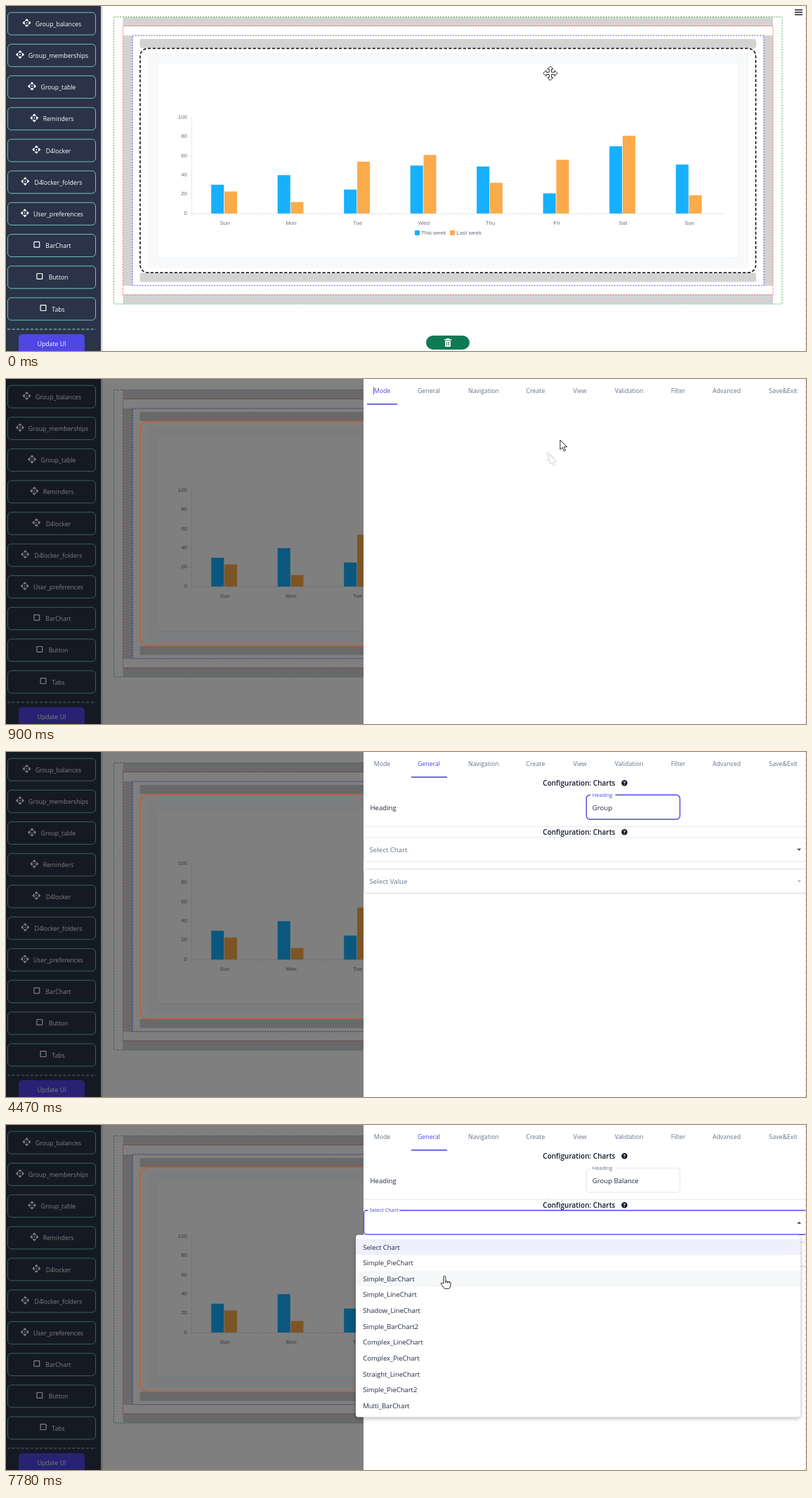
Recreate the animation shown at these times as an HTML page. Size 1139 by 492 pixels, loop 8 s.

```html
<!DOCTYPE html>
<html lang="en">
<head>
<meta charset="utf-8">
<title>Chart builder</title>
<style>
  html, body { margin: 0; width: 100%; height: 100%; overflow: hidden; background: #fff; }
  svg { display: block; width: 100vw; height: 100vh; }
  text { font-family: "Open Sans", "Noto Sans", sans-serif; white-space: pre; }
  .chart text { font-family: "Liberation Sans", Arial, sans-serif; font-size: 7.9px; fill: #6b7180; }
  .side text { font-size: 8.7px; fill: #fff; text-anchor: middle; }
  .tabs text { font-size: 8.8px; fill: #64748b; text-anchor: middle; }
  .title { font-size: 10px; font-weight: 600; fill: #111827; }
  .body { font-size: 9.6px; fill: #1e293b; }
  .muted { font-size: 9.7px; fill: #64748b; }
  .menu text { font-size: 9.45px; fill: #1e293b; }
  #menu { filter: drop-shadow(0 2px 3px rgba(0, 0, 0, .28)); }
</style>
</head>
<body>
<svg id="stage" viewBox="0 0 1139 492"></svg>
<script>
const LOOP = 8000, INDIGO = '#4f46e5', INK = '#1e293b', PALE = '#e2e6ec';

// ---------- markup helpers ----------
const attrs = o => Object.entries(o).map(([k, v]) => ` ${k}="${v}"`).join('');
const rect = (x, y, x2, y2, fill, more = {}) =>
  `<rect${attrs({ x, y, width: x2 - x, height: y2 - y, fill, ...more })}/>`;
const frame = (x, y, x2, y2, stroke, more = {}) => rect(x, y, x2, y2, 'none', { stroke, ...more });
const line = (x, y, x2, y2, stroke, more = {}) =>
  `<path${attrs({ d: `M${x} ${y}L${x2} ${y2}`, stroke, fill: 'none', ...more })}/>`;
const text = (x, y, str, more = {}) =>
  `<text${attrs({ x, y, ...more })}>${str.replace('&', '&amp;')}</text>`;
const group = (more, ...parts) => `<g${attrs(more)}>${parts.flat().join('')}</g>`;

// ---------- sidebar ----------
const tiles = [
  ['Group_balances', 29.5], ['Group_memberships', 20], ['Group_table', 37],
  ['Reminders', 40.3], ['D4locker', 43.3], ['D4locker_folders', 27.3],
  ['User_preferences', 26.8], ['BarChart', 43.8, 1], ['Button', 47.8, 1], ['Tabs', 53, 1]
];
const ARM = 'M0-6l2.1 2.1 2.5-2.5L0-11l-4.6 4.6 2.5 2.5z';
const moveIcon = (x, y) => group({ transform: `translate(${x} ${y}) scale(.55)`, fill: '#fff' },
  [0, 90, 180, 270].map(a => `<path d="${ARM}" transform="rotate(${a})"/>`),
  '<path d="M0-2l2 2-2 2-2-2z"/>');

function sidebar() {
  const rows = tiles.map(([name, x, box], i) => {
    const y = 9.2 + 45.2 * i;
    return frame(2.5, y, 127.5, y + 32, '#81e6d9', { rx: 5, 'stroke-width': .8 }) +
      (box ? frame(x - 3.9, y + 10.7, x + 3.9, y + 18.5, '#fff', { 'stroke-width': 1.2, rx: .5 })
           : moveIcon(x, y + 14.8)) +
      text(74.5, y + 19.5, name);
  });
  return group({ class: 'side' },
    rect(0, 0, 135, 492, '#2a3347'), rect(135, 0, 137.5, 492, '#d4d5d9'), rows,
    line(2, 461, 128, 461, '#81e6d9', { 'stroke-dasharray': '4 2.6', 'stroke-width': 1.2 }),
    rect(18, 468, 112, 496, INDIGO, { rx: 5 }), text(65, 485, 'Update UI'));
}

// ---------- canvas with chart ----------
const days = ['Sun', 'Mon', 'Tue', 'Wed', 'Thu', 'Fri', 'Sat', 'Sun'];
const thisWeek = [30, 40, 25, 50, 49, 21, 70, 51];
const lastWeek = [23, 12, 54, 61, 32, 56, 81, 19];
const BLUE = '#16b0ff', ORANGE = '#fcab4b';

function chart() {
  const top = v => 296 - 1.37 * v, step = 94.5;
  const ticks = [0, 20, 40, 60, 80, 100].map(v =>
    text(258, top(v) + 1.8, String(v), { 'text-anchor': 'end' }) +
    line(261.5, top(v), 264.5, top(v), '#e3e6ec', { 'stroke-width': .7 }));
  const bars = days.map((day, i) => {
    const c = 311.5 + step * i;
    return rect(c - 19.3, top(thisWeek[i]), c - 1.3, 296, BLUE) +
      rect(c - .5, top(lastWeek[i]), c + 17.5, 296, ORANGE) +
      text(c, 312, day, { 'text-anchor': 'middle' }) +
      line(264.5 + step * (i + 1), 296, 264.5 + step * (i + 1), 299, '#dde1e8', { 'stroke-width': .7 });
  });
  return group({ class: 'chart' }, ticks,
    line(264.5, 159, 264.5, 299, '#dde1e8', { 'stroke-width': .8 }), bars,
    line(264.5, 296.3, 1021, 296.3, '#dde1e8', { 'stroke-width': .8 }),
    rect(582, 320, 589, 327, BLUE, { rx: 1 }), text(591, 326.3, 'This week'),
    rect(632, 320, 639, 327, ORANGE, { rx: 1 }), text(641.3, 326.3, 'Last week'));
}

function canvas() {
  const grey = '#d3d3d3', thin = { 'stroke-width': .9, 'stroke-dasharray': '2 1.8' };
  return rect(166.5, 16, 1092, 29, grey) + rect(166.5, 411.5, 1092, 424.5, grey) +
    rect(167, 42, 180, 399, grey) + rect(1079, 42, 1092, 399, grey) +
    rect(190.5, 47, 1068, 60, grey, { rx: 3 }) + rect(190.5, 380.5, 1068, 393.5, grey, { rx: 3 }) +
    frame(153.5, 15.5, 1105, 425, '#3faa48', { ...thin, rx: 1 }) +
    frame(166.5, 28.5, 1092, 412, '#ff4a4a', thin) +
    frame(180, 42, 1079, 398.7, '#3a3aff', thin) +
    rect(191, 60.5, 1068, 380.5, '#fff', { rx: 11 }) +
    rect(202, 67, 1057, 374, '#f8f9fb', { rx: 2 }) +
    rect(217, 82.5, 1041.5, 360, '#eceef1', { rx: 4 }) +
    rect(217, 82, 1041, 359, '#fff', { rx: 4 }) + chart() +
    [5.6, 9, 12.4].map(y => line(1123, y, 1134, y, '#1a1a1a', { 'stroke-width': 1.5 })).join('') +
    rect(598, 470, 660, 490, '#0d7a55', { rx: 10 }) +
    rect(625.2, 477, 633, 486, '#fff', { rx: 1 }) + rect(624, 475, 634.3, 476.3, '#fff') +
    rect(627, 474, 631.2, 475.3, '#fff') +
    line(627.7, 478.8, 627.7, 484.2, '#0d7a55') + line(630.5, 478.8, 630.5, 484.2, '#0d7a55');
}

// ---------- settings drawer ----------
const tabs = [['Mode', 535.5], ['General', 602], ['Navigation', 680], ['Create', 754], ['View', 817],
  ['Validation', 887], ['Filter', 957], ['Advanced', 1026], ['Save&Exit', 1106.5]];
const ARROW = 'M0 0V13.6L3.2 10.7 5.4 15.8 7.6 14.9 5.4 9.9H9.9Z';

const heading = y => text(764.3, y + 3.6, 'Configuration: Charts', { class: 'title' }) +
  `<circle cx="880.5" cy="${y}" r="4.2" fill="#111827"/>` +
  text(880.5, y + 2.5, '?', { 'font-size': 7, 'font-weight': 700, fill: '#fff', 'text-anchor': 'middle' });

function drawer() {
  const ghost = (x, y) =>
    `<path d="${ARROW}" transform="translate(${x} ${y})" fill="#fff" stroke="#cfcfcf" stroke-width=".8"/>`;
  return group({ id: 'drawer' },
    rect(509, 0, 1139, 492, '#fff'),
    group({ id: 'trail' }, ghost(771.5, 104), ghost(774, 108)),
    group({ class: 'tabs' }, tabs.map(([name, x], i) => text(x, 20, name, { id: 'tab' + i }))),
    line(523.5, 11, 523.5, 22.5, '#555', { id: 'beam', 'stroke-width': .8 }),
    rect(514, 35, 557, 36.6, INDIGO, { id: 'underline' }),
    group({ id: 'general' },
      heading(44.3),
      text(518.5, 82.8, 'Heading', { class: 'body' }),
      frame(826.3, 61.3, 959.5, 96, PALE, { id: 'field', rx: 5 }),
      rect(832, 59.5, 867.5, 63.5, '#fff', { id: 'notch' }),
      text(0, 0, 'Heading', { id: 'label', class: 'muted' }),
      text(834.8, 82.8, '', { id: 'typed', class: 'body' }),
      rect(0, 72.5, .9, 86, '#111', { id: 'caret' }),
      line(509, 106.3, 1139, 106.3, '#e4e7ec'),
      heading(114.3),
      frame(509.5, 121.8, 1143, 156.3, PALE, { id: 'select', rx: 4 }),
      rect(515.5, 119.5, 560, 123.5, '#fff', { id: 'selectNotch' }),
      text(0, 0, 'Select Chart', { id: 'selectLabel', class: 'muted' }),
      '<path id="chevron" fill="#444"/>',
      frame(509.5, 167, 1143, 201.5, '#d5dae2', { rx: 4 }),
      text(517.5, 187.7, 'Select Value', { class: 'muted' }),
      '<path d="M1126.2 183h6l-3 3z" fill="#b5b8bd"/>'));
}

const options = ['Select Chart', 'Simple_PieChart', 'Simple_BarChart', 'Simple_LineChart',
  'Shadow_LineChart', 'Simple_BarChart2', 'Complex_LineChart', 'Complex_PieChart',
  'Straight_LineChart', 'Simple_PieChart2', 'Multi_BarChart'];
const ROW = 22.65, ROW_TOP = 162.8;

const menu = () => group({ id: 'menu', class: 'menu' },
  rect(498, 156.7, 1131, 416.5, '#fff', { rx: 4 }),
  rect(498, ROW_TOP, 1131, ROW_TOP + ROW, '#f0effc'),
  rect(498, 0, 1131, ROW, '#f6f7f8', { id: 'hover' }),
  options.map((o, i) => text(508.3, ROW_TOP + 14.7 + ROW * i, o)));

// ---------- pointers ----------
const CROSS = 'M-1.6-1.6V-6H-4.2L0-10.2 4.2-6H1.6V-1.6H6V-4.2L10.2 0 6 4.2V1.6H1.6V6H4.2L0 10.2-4.2 6H-1.6V1.6H-6V4.2L-10.2 0-6-4.2V-1.6Z';
const HAND = 'M-1.5 10.5V1.3a1.4 1.4 0 0 1 2.9 0V7.2l5.6 1.1q2 .5 1.8 2.4l-.9 4.6q-.5 2.6-2.6 2.6h-4.5q-1.5 0-2.4-1.4l-3.2-4.7q-.9-1.4.2-2 1-.4 1.9.5zM1.4 7V10M4 7.8V10.2M6.5 8.3v2';

document.getElementById('stage').innerHTML =
  rect(0, 0, 1139, 492, '#fff') + canvas() + sidebar() +
  rect(0, 0, 1139, 492, '#000', { id: 'dim' }) +
  frame(191, 60.5, 1067.5, 380.3, '#000', { id: 'ring', rx: 11, 'stroke-width': 1.5 }) +
  drawer() + menu() +
  line(1138.3, 0, 1138.3, 492, '#d2d4d8', { 'stroke-dasharray': '5 3', 'stroke-width': .9 }) +
  '<circle id="click" r="10.6" fill="#fdf03a" opacity=".9"/>' +
  '<path id="pointer" fill="#fff" stroke="#111" stroke-width=".9" stroke-linejoin="round"/>';

// ---------- timeline ----------
const DRAWER = 650, GENERAL = 1570, FOCUS = 2340, OPEN = 7090;
const phrase = 'Group Balance';
const keys = [3210, 3540, 3740, 3940, 4140, 4270, 4800, 4900, 5000, 5190, 5740, 6070, 6140];
const caretOn = [[FOCUS, 2830], [3210, 4470], [4800, 5520], [5740, 6670]];
const clicks = [[230, 300], [370, 440], [1500, 1640], [2300, 2440], [7030, 7100]];
const dimming = [[650, 0], [730, .086], [810, .3], [900, .5]];
const path = [
  [0, 775, 96], [579, 775, 96], [580, 771, 104], [810, 771, 104], [900, 789, 87], [970, 786, 82],
  [1360, 610, 25], [1500, 603, 22], [1640, 603, 22], [1970, 827, 92], [2170, 829, 91],
  [2300, 849, 82], [6470, 849, 82], [6960, 741, 137], [7260, 741, 137], [7420, 715, 160],
  [7700, 624.5, 215.5]
];

const $ = id => document.getElementById(id);
const set = (id, o) => { for (const k in o) $(id).setAttribute(k, o[k]); };
const show = (id, on) => { $(id).style.display = on ? '' : 'none'; };
const within = (spans, t) => spans.some(([a, b]) => t >= a && t < b);
const ramp = (t, start, ms) => Math.min(1, Math.max(0, (t - start) / ms));
const easeOut = p => 1 - (1 - p) ** 3;
const smooth = p => p * p * (3 - 2 * p);
const mix = (a, b, p) => a + (b - a) * p;

function sample(table, t) {
  const i = table.findIndex(k => k[0] > t);
  if (i < 0) return table[table.length - 1].slice(1);
  if (i === 0) return table[0].slice(1);
  const a = table[i - 1], b = table[i], p = (t - a[0]) / (b[0] - a[0]);
  return a.slice(1).map((v, j) => mix(v, b[j + 1], p));
}

function floatLabel(id, x, y, rise, p, size) {
  set(id, { transform: `translate(${x} ${y - rise * p}) scale(${mix(1, size, p)})` });
}

function draw(t) {
  const [px, py] = sample(path, t);
  const general = t >= GENERAL, open = t >= OPEN;
  const focused = t >= FOCUS && !open;

  set('dim', { opacity: sample(dimming, t)[0] });
  set('ring', {
    'stroke-dasharray': t < 580 ? '4.2 2.6' : 'none',
    stroke: t < 810 ? '#000' : '#c65d33'
  });

  show('drawer', t >= DRAWER);
  show('general', general);
  show('beam', t < 2030);
  show('trail', t >= 810);
  set('trail', { opacity: general ? .4 : 1 });
  set('tab0', { style: general ? '' : `fill:${INDIGO}` });
  set('tab1', { style: general ? `fill:${INDIGO}` : '' });
  const slide = smooth(ramp(t, GENERAL, 300));
  set('underline', { x: mix(514, 577, slide), width: mix(43, 51, slide) });

  // heading field
  const lift = easeOut(ramp(t, FOCUS, 160));
  set('field', { stroke: focused ? INDIGO : PALE, 'stroke-width': focused ? 1.4 : 1 });
  floatLabel('label', 834.8, 82.3, 18.3, lift, .76);
  set('label', { style: focused ? `fill:${INDIGO}` : '' });
  show('notch', lift > 0);
  const typed = $('typed'), value = phrase.slice(0, keys.filter(k => k <= t).length);
  if (typed.textContent !== value) typed.textContent = value;
  const blink = general && within(caretOn, t);
  show('caret', blink);
  if (blink) set('caret', { x: 835 + (value ? typed.getComputedTextLength() : 0) });

  // chart select
  const over = px > 509 && py > 121 && py < 157 && t > 6470;
  const raise = easeOut(ramp(t, OPEN, 180));
  set('select', { stroke: open ? INDIGO : over ? INK : PALE, 'stroke-width': open ? 1.4 : 1 });
  floatLabel('selectLabel', 517.5, 142.5, 18.2, raise, .76);
  set('selectLabel', { style: open ? `fill:${INDIGO}` : '' });
  show('selectNotch', open);
  set('chevron', { d: open ? 'M1126.2 140.7h6l-3-3z' : 'M1126.2 137.7h6l-3 3z' });

  const grow = easeOut(ramp(t, OPEN, 230)), s = mix(.75, 1, grow);
  show('menu', open);
  set('menu', {
    opacity: grow,
    transform: `translate(814.5 156.7) scale(${s} ${s * s}) translate(-814.5 -156.7)`
  });
  const row = Math.floor((py - ROW_TOP) / ROW);
  show('hover', row > 0);
  set('hover', { y: ROW_TOP + ROW * row });

  // pointer
  show('click', within(clicks, t));
  set('click', { cx: px, cy: py });
  show('pointer', t < 3210 || t >= 6470);
  set('pointer', {
    d: t < 580 ? CROSS : open && py > 157 ? HAND : ARROW,
    transform: `translate(${px} ${py})`
  });
}

const start = performance.now();
function tick() {
  draw((performance.now() - start) % LOOP);
  requestAnimationFrame(tick);
}
tick();
</script>
</body>
</html>
```
